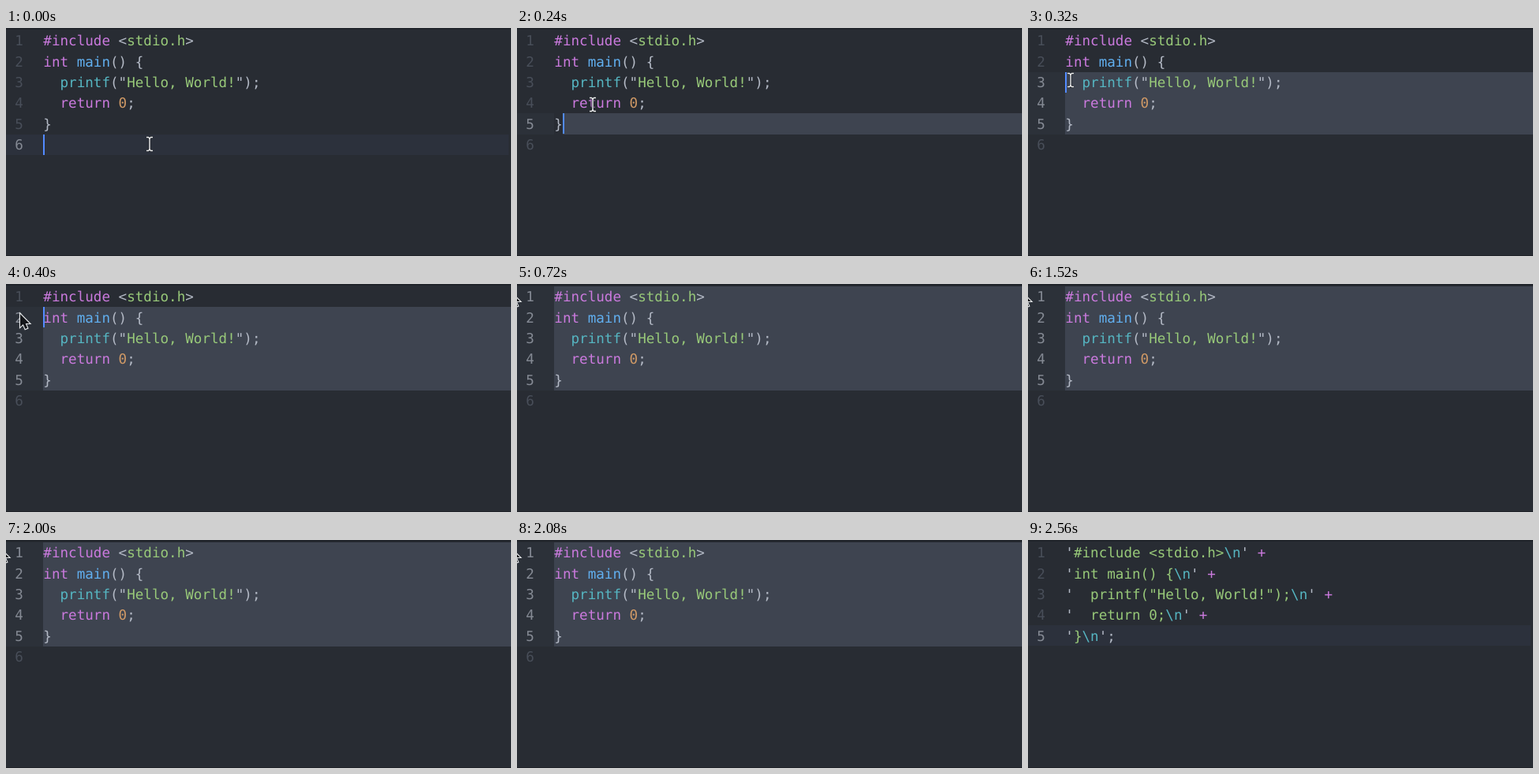
Write an HTML page with a canvas that moves like this. It is 640 px wide and 289 px high and loops after 2.64 s.

```html
<!DOCTYPE html>
<html lang="en">
<head>
<meta charset="utf-8">
<title>Code to string</title>
<style>
  html, body { margin: 0; width: 100%; height: 100%; overflow: hidden; background: #282c33; }
  canvas { display: block; }
</style>
</head>
<body>
<canvas id="stage" width="640" height="289"></canvas>
<script>
const ctx = document.getElementById('stage').getContext('2d');
const W = 640, H = 289, LOOP = 2640, STEP = 80;
const LEFT = 47.3, TOP = 3, ROW = 26.35, COL = 10.584;
const COLORS = {
  p: '#cb7ade', b: '#61afef', c: '#56b6c2', g: '#98c979', o: '#d19a66', w: '#b4bac6'
};

// Each line is a list of [colour key, text] runs.
const PROGRAM = [
  [['p', '#include '], ['w', '<'], ['g', 'stdio.h'], ['w', '>']],
  [['p', 'int '], ['b', 'main'], ['w', '() {']],
  [['w', '  '], ['c', 'printf'], ['w', '("'], ['g', 'Hello, World!'], ['w', '");']],
  [['w', '  '], ['p', 'return '], ['o', '0'], ['w', ';']],
  [['w', '}']],
  []
];

// The same program, quoted line by line.
const QUOTED = PROGRAM.slice(0, 5).map((runs, i) => [
  ['w', "'"], ['g', runs.map(r => r[1]).join('')], ['c', '\\n'], ['w', "'"],
  i < 4 ? ['p', ' +'] : ['w', ';']
]);

const lineLength = runs => runs.reduce((n, r) => n + r[1].length, 0);
const rowY = row => TOP + row * ROW;
const colX = col => LEFT + col * COL;

// Pointer positions, one per step; the last one stays.
const POINTER = [
  [182, 147], [166, 138], [132, 119], [96, 97], [54, 66],
  [18, 38], [2, 22], [-6, 12], [-8, 10]
];

// Caret as [start time, row, column]
const CARET = [[0, 5, 0], [160, 4, 1], [320, 2, 0], [400, 1, 0], [480, 0, 0], [2160, 4, 6]];
const PASTE = 2160;

function caretVisible(t) {
  if (t < 720) return true;
  if (t >= PASTE) return t < 2400;
  return t < 2000 && Math.floor((t - 720) / 320) % 2 === 1;
}

function rect(x, y, w, h, color) {
  ctx.fillStyle = color;
  ctx.fillRect(x, y, w, h);
}

function drawText(text, x, row, color) {
  ctx.fillStyle = color;
  ctx.fillText(text, x, rowY(row) + 19.2);
}

function drawLine(runs, row) {
  let col = 0;
  for (const [key, text] of runs) {
    drawText(text, colX(col), row, COLORS[key]);
    col += text.length;
  }
}

function drawSelection(row, col) {
  for (let r = row; r < 5; r++) {
    const x = r === row ? colX(col) : LEFT;
    const y = Math.round(rowY(r)), h = Math.round(rowY(r + 1)) - y;
    rect(0, y, 47, h, '#2c3139');
    rect(Math.round(x), y, W, h, '#3e4450');
  }
}

function strokePath(points, width, color, close) {
  ctx.beginPath();
  points.forEach(([x, y]) => ctx.lineTo(x, y));
  if (close) ctx.closePath();
  ctx.lineWidth = width;
  ctx.strokeStyle = color;
  ctx.stroke();
}

function drawBeam(x, y) {
  for (const [width, color] of [[3, '#20242a'], [1.4, '#f0f1f3']]) {
    strokePath([[x, y - 8], [x, y + 8]], width, color);
    for (const s of [-1, 1]) {
      strokePath([[x - 4, y + s * 8.5], [x - 1.5, y + s * 8.5], [x, y + s * 7],
        [x + 1.5, y + s * 8.5], [x + 4, y + s * 8.5]], width, color);
    }
  }
}

function drawArrow(x, y) {
  const shape = [[0, 0], [0, 16.5], [3.8, 13], [6.4, 19], [9.2, 17.8], [6.7, 12], [11.8, 12]]
    .map(([dx, dy]) => [x + dx, y + dy]);
  strokePath(shape, 2.2, '#e8eaec', true);
  ctx.fillStyle = '#14161a';
  ctx.fill();
}

function draw(now) {
  const t = Math.floor((now % LOOP) / STEP) * STEP;
  const pasted = t >= PASTE;
  const lines = pasted ? QUOTED : PROGRAM;
  const [, row, col] = CARET.filter(c => c[0] <= t).pop();
  const selecting = !pasted && row < 5;

  rect(0, 0, W, H, '#282c33');
  rect(0, 0, W, 2, '#20242a');
  rect(0, H - 1, W, 1, '#1f2228');
  if (selecting) drawSelection(row, col);
  else rect(0, Math.round(rowY(row)), 637, 26, '#2c313c');

  ctx.font = '17.58px "DejaVu Sans Mono", monospace';
  ctx.textRendering = 'geometricPrecision';
  lines.forEach((runs, i) => {
    const active = selecting ? i >= row && i < 5 : i === row;
    drawText(String(i + 1), 11.2, i, active ? '#858a94' : '#484e59');
    drawLine(runs, i);
  });

  if (caretVisible(t)) {
    const x = Math.min(col, lineLength(lines[row]));
    rect(Math.round(colX(x)), Math.round(rowY(row)), 2, 26, '#528bff');
  }

  if (!pasted) {
    const [x, y] = POINTER[Math.min(t / STEP, POINTER.length - 1)];
    (x < LEFT ? drawArrow : drawBeam)(x, y);
  }
}

const start = performance.now();
function tick() {
  draw(performance.now() - start);
  requestAnimationFrame(tick);
}
tick();
</script>
</body>
</html>
```
